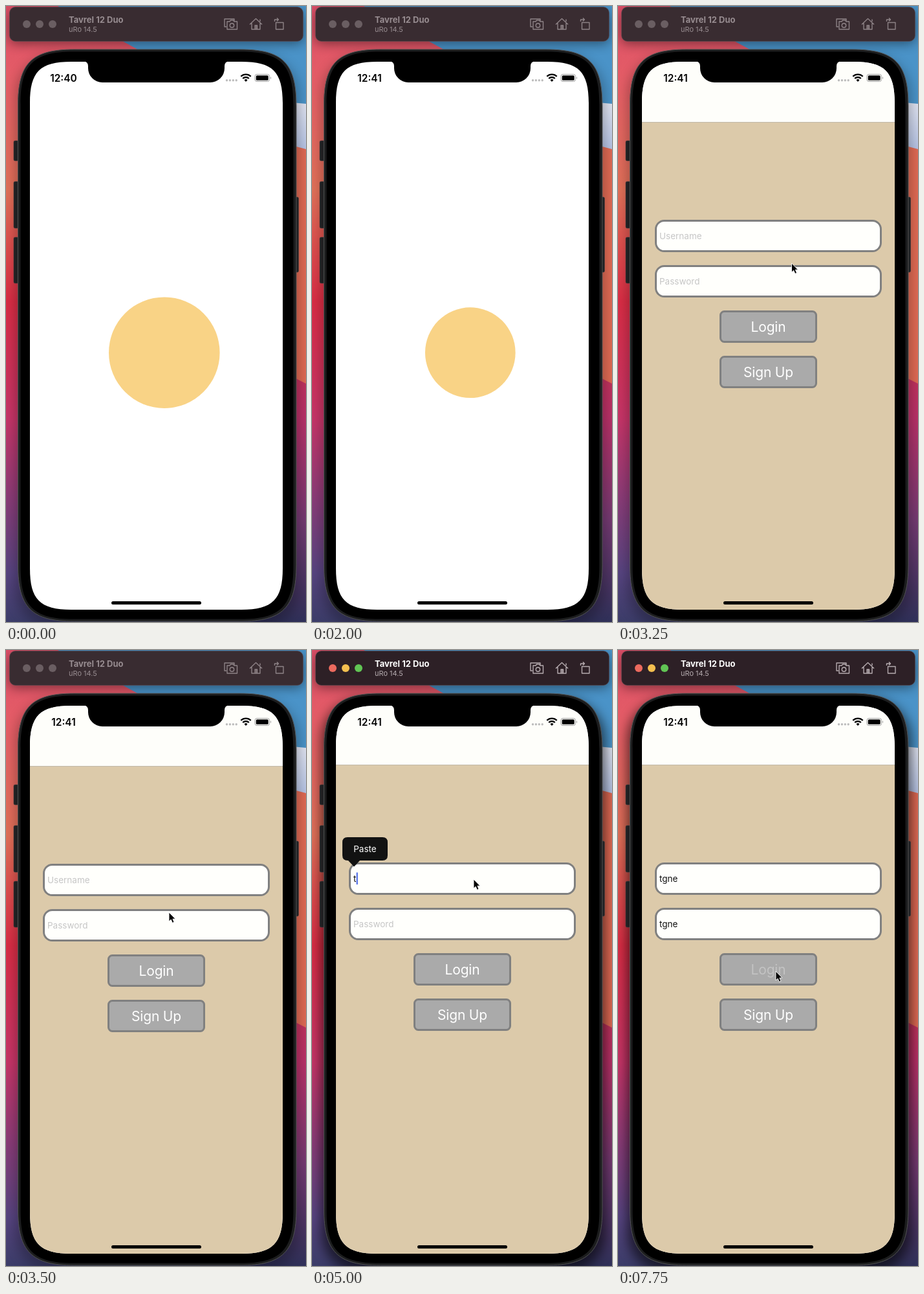
Animation, 464 px wide and 951 px high, one loop 8 s. Source, as an HTML page:

```html
<!DOCTYPE html>
<html lang="en">
<head>
<meta charset="utf-8">
<title>Login demo</title>
<style>
  html, body { margin: 0; width: 100%; height: 100%; overflow: hidden; background: #333; }
  svg { display: block; font-family: Inter, "Liberation Sans", sans-serif; }
  .middle { text-anchor: middle; }
  .button { font-size: 21px; letter-spacing: -.2px; text-anchor: middle; }
  .field { font-size: 13.5px; }
  .box { stroke: #808080; stroke-width: 3; }
</style>
</head>
<body>
<svg width="464" height="951" viewBox="0 0 464 951">
  <defs>
    <linearGradient id="leftWall" x2="0" y2="1">
      <stop offset="0" stop-color="#dc4f68"/><stop offset=".13" stop-color="#e55e66"/>
      <stop offset=".3" stop-color="#e07058"/><stop offset=".4" stop-color="#dc4a4c"/>
      <stop offset=".48" stop-color="#d92d45"/><stop offset=".67" stop-color="#c63568"/>
      <stop offset=".8" stop-color="#8a3c78"/><stop offset=".92" stop-color="#574480"/>
      <stop offset="1" stop-color="#3b3c68"/>
    </linearGradient>
    <linearGradient id="rightWall" x2="0" y2="1">
      <stop offset="0" stop-color="#c93450"/><stop offset=".3" stop-color="#b93168"/>
      <stop offset=".65" stop-color="#743a72"/><stop offset="1" stop-color="#2f3058"/>
    </linearGradient>
    <linearGradient id="pale" x2="0" y2="1">
      <stop offset="0" stop-color="#e3e6f2"/><stop offset="1" stop-color="#b4c2e4"/>
    </linearGradient>
    <filter id="blur" x="-20%" y="-50%" width="140%" height="200%"><feGaussianBlur stdDeviation="9"/></filter>
    <clipPath id="screen"><path id="screenEdge"/></clipPath>
  </defs>

  <!-- Wallpaper -->
  <rect width="464" height="951" fill="url(#leftWall)"/>
  <path d="M80 0H464V152L330 140 200 65Z" fill="#4a93c8"/>
  <path d="M400 145L464 151V222L400 205Z" fill="url(#pale)"/>
  <path d="M400 204L464 221V590L400 550Z" fill="#e06a54"/>
  <path d="M300 500L464 583V951H300Z" fill="url(#rightWall)"/>
  <rect id="shadow" x="14" y="76" width="440" height="885" rx="62" filter="url(#blur)"/>
  <rect x="5" y="8" width="455" height="50" rx="9" opacity=".45" filter="url(#blur)"/>

  <!-- Title bar -->
  <rect id="bar" x="5.5" y="1.5" width="454" height="53" rx="9" stroke="#5a4a50" stroke-opacity=".6"/>
  <g id="lights"><circle cx="32" cy="28" r="6"/><circle cx="52" cy="28" r="6"/><circle cx="72" cy="28" r="6"/></g>
  <text id="title" x="97" y="25.5" font-size="13" font-weight="700">Tavrel 12 Duo</text>
  <text id="version" x="97" y="40" font-size="11">uRo 14.5</text>
  <g id="icons" fill="none" stroke-width="1.4" stroke-linejoin="round">
    <path d="M341 32H338V20H353V23M342 24H346L347.5 22H351.5L353 24H357.5V36H342Z"/>
    <circle cx="349.5" cy="30" r="3.2"/>
    <path d="M377 28.5L386.5 19.5 396 28.5M380 26.5V36H393V26.5M393 24V20.5M385 36V30H388.5V36M386.8 30V36"/>
    <path d="M417.5 25.5H429V36H417.5ZM415.5 24V21H421M419 18.5L421.5 21 419 23.5"/>
  </g>

  <!-- Phone body -->
  <g fill="#202022" stroke="#3c3c3e" stroke-width=".6">
    <rect x="12" y="208" width="8" height="31" rx="2"/>
    <rect x="12" y="271" width="8" height="72" rx="2"/>
    <rect x="12" y="357" width="8" height="71" rx="2"/>
    <rect x="445" y="295" width="7.5" height="116" rx="2"/>
  </g>
  <path id="frame" fill="#1c1d1e" stroke="#515253"/>
  <path id="bezel"/>

  <!-- Screen -->
  <g clip-path="url(#screen)">
    <rect x="37" y="86" width="391" height="846" fill="#fff"/>
    <circle id="logo" cx="244.8" cy="535.2" fill="#f9d386"/>
    <g id="login">
      <rect x="37" y="177" width="391" height="760" fill="#dccaaa"/>
      <rect x="37" y="80" width="391" height="97" fill="#fefefa"/>
      <rect x="37" y="177" width="391" height="1" fill="#c0b8a8"/>
      <g class="box" fill="#fffffc">
        <rect x="58.5" y="329.5" width="348" height="47" rx="13"/>
        <rect x="58.5" y="399.5" width="348" height="47" rx="13"/>
      </g>
      <g class="box" fill="#aaa">
        <rect x="158.5" y="469.5" width="148" height="47" rx="6"/>
        <rect x="158.5" y="539.5" width="148" height="47" rx="6"/>
      </g>
      <text id="user" class="field" x="64" y="358"></text>
      <text id="pass" class="field" x="64" y="428"></text>
      <rect id="caret" width="2" height="18.5" fill="#4363e6"/>
      <text id="submit" class="button" x="232.5" y="501">Login</text>
      <text class="button" x="232.5" y="571" fill="#fff">Sign Up</text>
      <g id="paste">
        <path d="M55 289H109Q117 289 117 297V317Q117 325 109 325H74L65 334.5 56 325H55Q47 325 47 317V297Q47 289 55 289Z" fill="#121212"/>
        <text class="field middle" x="82" y="312" fill="#fff">Paste</text>
      </g>
    </g>
  </g>
  <path d="M120 85Q127 86 127 93V96A22 22 0 0 0 149 118H316A22 22 0 0 0 338 96V93Q338 86 345 85Z"/>
  <rect x="163" y="919" width="139" height="5" rx="2.5"/>

  <!-- Status bar -->
  <text id="clock" class="middle" x="89" y="116.5" font-size="15.5" font-weight="600"></text>
  <path d="M341.5 114.7H357" stroke="#bcbcbc" stroke-width="3.4" stroke-linecap="round" stroke-dasharray="0 4.9"/>
  <g fill="none" stroke="#000" stroke-width="2.3">
    <path d="M363.3 108.8A11 11 0 0 1 378.7 108.8M366.2 112A6.8 6.8 0 0 1 375.8 112"/>
    <path d="M371 117L368.5 114.3A3.5 3.5 0 0 1 373.5 114.3Z" fill="#000" stroke="none"/>
  </g>
  <rect x="385" y="105.5" width="22.5" height="11" rx="3" fill="none" stroke="#a0a0a0"/>
  <rect x="386.7" y="107.2" width="19" height="7.6" rx="1.6"/>
  <path d="M409 109Q411 111 409 113Z" fill="#999"/>

  <path id="cursor" d="M0 0V14L3.2 11.2 5.4 16.3 8 15.2 5.9 10.2H10Z" stroke="#fff" stroke-width=".9"/>
</svg>
<script>
const LOOP = 8000, STEP = 250;
const WORD = "tgne";
const el = id => document.getElementById(id);
const set = (id, attrs) => { for (const k in attrs) el(id).setAttribute(k, attrs[k]); };
const show = (id, on) => set(id, { visibility: on ? "visible" : "hidden" });

// Rectangle whose corners ease into the sides
function smoothRect(x, y, w, h, r) {
  const e = 1.36 * r, c = .33 * r, d = e - c;
  return `M${x} ${y + e}c0 ${-d} ${c} ${-e} ${e} ${-e}h${w - 2 * e}c${d} 0 ${e} ${c} ${e} ${e}` +
    `v${h - 2 * e}c0 ${d} ${-c} ${e} ${-e} ${e}h${2 * e - w}c${-d} 0 ${-e} ${-c} ${-e} ${-e}z`;
}
set("frame", { d: smoothRect(18.5, 67, 430.5, 883, 64) });
set("bezel", { d: smoothRect(22.5, 70.5, 422, 876, 60) });
set("screenEdge", { d: smoothRect(37, 86, 391, 846, 47) });

// Cursor stops: time, x, y
const path = [
  [2500, 357, 440], [3000, 285, 389], [3500, 252, 405], [4000, 250, 354],
  [5750, 250, 354], [6500, 249, 503], [6750, 249, 503], [7000, 244, 496], [8000, 244, 496]
];

function cursorAt(t) {
  const i = Math.max(1, path.findIndex(p => p[0] >= t));
  const [a, b] = [path[i - 1], path[i]];
  const k = (t - a[0]) / (b[0] - a[0]);
  return [a[1] + (b[1] - a[1]) * k, a[2] + (b[2] - a[2]) * k];
}

// Underdamped spring from full size to rest
function logoRadius(t) {
  const s = Math.max(0, t - 600) / 1000, decay = 1.34, w = 3.93;
  return 68.6 + 17.2 * Math.exp(-decay * s) * (Math.cos(w * s) + decay / w * Math.sin(w * s));
}

function fillField(id, typed, hint) {
  el(id).textContent = typed || hint;
  set(id, { fill: typed ? "#111" : "#c6c6c6" });
}

function drawCaret(t, user, pass) {
  const inPass = t >= 5500;
  const typed = inPass ? pass : user;
  const x = typed ? 64.3 + el(inPass ? "pass" : "user").getComputedTextLength() : 64.5;
  set("caret", { x, y: inPass ? 413.5 : 343.5, opacity: t === 6500 || t === 7500 ? .6 : 1 });
  const off = (t >= 4500 && t < 5000) || t === 6750 || t === 7750;
  show("caret", t >= 4000 && !off);
}

function render(t) {
  const active = t >= 3750, login = t >= 3250;
  set("shadow", { opacity: active ? .58 : .25 });
  set("bar", { fill: active ? "#2d2026" : "#392c31" });
  const colours = active ? ["#ec6a5e", "#f4bf4f", "#61c554"] : Array(3).fill("#6a5e62");
  [...el("lights").children].forEach((dot, i) => dot.setAttribute("fill", colours[i]));
  set("title", { fill: active ? "#fff" : "#978c90" });
  set("version", { fill: active ? "#b5abaf" : "#978c90" });
  set("icons", { stroke: active ? "#b5abaf" : "#8d8286" });

  el("clock").textContent = t < 1000 ? "12:40" : "12:41";
  set("logo", { r: logoRadius(t) });
  show("logo", !login);
  set("login", {
    display: login ? "inline" : "none",
    transform: `translate(0 ${active ? 0 : 2})`
  });

  const user = WORD.slice(0, t < 5000 ? 0 : t < 5250 ? 1 : 4);
  const pass = WORD.slice(0, t < 6000 ? 0 : t < 6250 ? 2 : 4);
  fillField("user", user, "Username");
  fillField("pass", pass, "Password");
  if (login) drawCaret(t, user, pass);
  else show("caret", false);
  show("paste", t >= 4000 && t < 5250);
  set("submit", { fill: t >= 7500 ? "#c3c3c3" : "#fff" });

  show("cursor", t >= path[0][0]);
  set("cursor", { transform: `translate(${cursorAt(t)})` });
}

function tick() {
  const t = performance.now() % LOOP;
  render(Math.floor(t / STEP) * STEP);
  requestAnimationFrame(tick);
}
tick();
</script>
</body>
</html>
```
